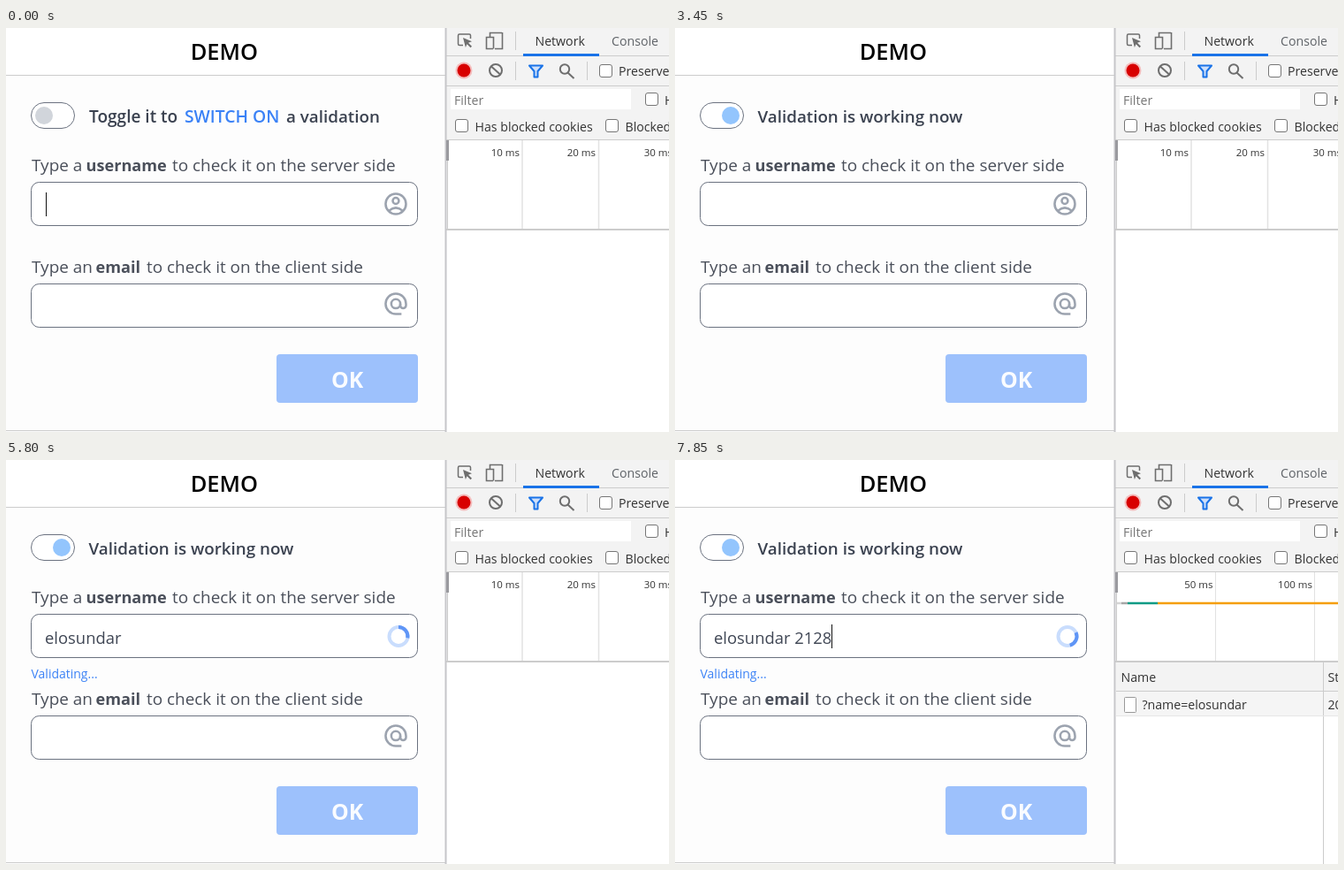
Animation of 750 by 457 pixels, one loop 8 s. Source, as an HTML page:

```html
<!DOCTYPE html>
<html lang="en">
<head>
<meta charset="utf-8">
<title>Form validation demo</title>
<style>
html, body { margin: 0; width: 100%; height: 100%; overflow: hidden; background: #fff; }
svg { display: block; width: 750px; height: 457px; font-family: "Open Sans", "Noto Sans", sans-serif; }
text { white-space: pre; }
.label { font-size: 18.95px; fill: #4a4f5a; }
.label .b { font-size: 18.15px; font-weight: 700; }
.head { font-size: 18.8px; font-weight: 600; fill: #3b4250; }
.hint { font-size: 14px; }
.hint .b { font-weight: 700; }
.tool { font-size: 14.15px; fill: #333; }
.tick { font-size: 11.5px; fill: #333; }
.line { fill: none; stroke: #ccc; }
.box { fill: #fff; stroke: #767676; }
.field { fill: #fff; stroke: #6b7280; }
.icon { fill: none; stroke: #9ca3af; stroke-width: 2; }
.grey { fill: none; stroke: #6e6e6e; stroke-width: 2; }
</style>
</head>
<body>
<svg viewBox="0 0 750 457">
  <defs>
    <rect id="check" x=".5" y=".5" width="14" height="14" rx="2.5" class="box"/>
  </defs>

  <!-- form -->
  <rect width="498" height="457" fill="#fdfdfd"/>
  <rect width="497" height="53" fill="#fff"/>
  <path class="line" d="M0 53.5H497M0 455.5H497" stroke="#d1d5db"/>
  <text x="208.7" y="36" font-size="25.4" font-weight="600">DEMO</text>

  <rect x="28.5" y="84.5" width="49" height="29" rx="14.5" class="field"/>
  <circle id="knob" cy="99" r="10"/>
  <g id="offText" class="head">
    <text x="94" y="107" font-size="19">Toggle it to</text>
    <text x="202" y="107" style="font-size:19.3px" fill="#3b82f6">SWITCH ON</text>
    <text x="317" y="107">a validation</text>
  </g>
  <text id="onText" class="head" x="93.5" y="107">Validation is working now</text>

  <g class="label">
    <text y="162"><tspan x="29">Type a</tspan><tspan x="90.5" class="b">username</tspan><tspan x="188">to check it on the server side</tspan></text>
    <text y="277"><tspan x="29">Type an</tspan><tspan x="101.5" class="b">email</tspan><tspan x="159">to check it on the client side</tspan></text>
  </g>

  <rect id="nameField" x="28.5" y="174.5" width="437" height="49" rx="9" class="field"/>
  <rect x="28.5" y="289.5" width="437" height="49" rx="9" class="field"/>
  <text id="typed" x="44" y="208" font-size="18.4" fill="#3f4654"></text>
  <rect id="caret" y="186" width="1" height="27" fill="#111"/>

  <g id="userIcon" class="icon" transform="translate(425.6 183.6) scale(1.28)">
    <circle cx="12" cy="12" r="9"/>
    <circle cx="12" cy="9.3" r="2.7"/>
    <path d="M6 18Q12 12.8 18 18"/>
  </g>
  <g id="okIcon" class="icon" style="stroke:#059669" transform="translate(425.6 183.6) scale(1.28)">
    <circle cx="12" cy="12" r="9"/>
    <path d="M8 12.2l2.8 2.8l5.2-5.2"/>
  </g>
  <g id="spinner" fill="none" stroke-width="4">
    <circle cx="444" cy="199.5" r="10.5" stroke="#c9ddfd"/>
    <path id="arc" d="M444 189A10.5 10.5 0 0 1 454.3 201.3" stroke="#5f95f6"/>
  </g>
  <g class="icon" transform="translate(425.6 296.6) scale(1.28)">
    <circle cx="12" cy="12" r="4"/>
    <path d="M16 12v1.4a2.5 2.5 0 0 0 5 0V12a9 9 0 1 0-9 9h5"/>
  </g>

  <text id="busy" class="hint" x="28.5" y="247" fill="#3b82f6">Validating...</text>
  <text id="found" class="hint" y="247" fill="#059669"><tspan x="28.5">The username '</tspan><tspan x="129" class="b">elosundar</tspan><tspan x="198">' found on the server</tspan><tspan x="340" class="b">60600</tspan><tspan x="387">times</tspan></text>

  <rect x="306" y="369" width="160" height="55" rx="4" fill="#9dc1fc"/>
  <text x="386" y="407" font-size="24.8" font-weight="700" fill="#fafcff" text-anchor="middle">OK</text>

  <!-- network panel -->
  <rect x="498" width="252" height="457" fill="#fff"/>
  <rect x="498" width="252" height="126" fill="#f3f3f3"/>
  <rect x="503" y="69" width="204" height="23" fill="#fff"/>
  <path class="line" d="M498 31.5H750M498 65.5H750M498 126.5H750M576.5 4V25M576.5 38V59M657.5 38V59"/>
  <path class="line" d="M497.5 0V457" stroke-width="2" style="stroke:#c6c6c9"/>
  <rect x="585" y="29" width="86" height="3" fill="#1a73e8"/>

  <g class="grey" stroke-width="1.6">
    <path d="M517 19.5H513a1.500 1.500 0 0 1-1.500-1.500V8.500A1.500 1.500 0 0 1 513 7H524a1.500 1.500 0 0 1 1.500 1.500V12" style="stroke-width:1.5"/>
    <path d="M517 11l10 4.200-4 1.500 4 4-1.500 1.500-4-4-1.600 3.800z" fill="#6e6e6e" stroke="none"/>
    <path d="M547.500 10V5.500H561M551 23.500H543.500V10.500H551.500V23.500M553 23.500H561.500V5" style="stroke-width:1.6"/>
    <circle cx="554" cy="48" r="7"/>
    <path d="M549 43.500L559 52.500"/>
    <circle cx="632" cy="46.500" r="5.200"/>
    <path d="M635.500 50.500L642.500 57"/>
  </g>
  <circle cx="518" cy="48" r="9.500" fill="#f4bcbc"/>
  <circle cx="518" cy="48" r="7.500" fill="#d80000"/>
  <path d="M592 42.500H607L601.500 49V55.500H597.500V49z" fill="#cfe0fa" stroke="#1a73e8" stroke-width="2" stroke-linejoin="round"/>

  <use href="#check" x="671" y="41"/>
  <use href="#check" x="723" y="73"/>
  <use href="#check" x="508" y="103"/>
  <use href="#check" x="678" y="103"/>
  <g class="tool">
    <text x="598.5" y="20">Network</text>
    <text x="685" y="20" fill="#5f6368">Console</text>
    <text x="693" y="54">Preserve log</text>
    <text x="507" y="87" fill="#757575">Filter</text>
    <text x="745" y="87">Hide</text>
    <text x="530.5" y="117">Has blocked cookies</text>
    <text x="700.5" y="117">Blocked Requests</text>
  </g>

  <path class="line" d="M499.5 127V227"/>
  <path class="line" d="M498 228H750" stroke-width="2"/>
  <g id="idle">
    <path class="line" d="M584 127V227M670.5 127V227" style="stroke:#e2e2e2" stroke-width="1.5"/>
    <g class="tick" text-anchor="end">
      <text x="581" y="145">10 ms</text>
      <text x="667" y="145">20 ms</text>
      <text x="754" y="145">30 ms</text>
    </g>
  </g>
  <g id="loaded">
    <path class="line" d="M611.5 127V227M723.5 127V227" style="stroke:#e2e2e2"/>
    <g class="tick" text-anchor="end">
      <text x="608.5" y="145">50 ms</text>
      <text x="721" y="145">100 ms</text>
    </g>
    <g fill="none" stroke-width="2.5">
      <path d="M500 162H505" stroke="#d5d5d5"/>
      <path d="M505 162H512" stroke="#a6a6a6"/>
      <path d="M512 162H546" stroke="#0d9b85"/>
      <path d="M546 162H750" stroke="#f59e0b"/>
    </g>
    <rect x="499" y="229" width="251" height="32" fill="#f3f3f3"/>
    <rect x="499" y="262" width="251" height="27" fill="#f5f5f5"/>
    <path class="line" d="M499 261.5H750M733.5 229V457"/>
    <path class="line" d="M499 289.5H750" style="stroke:#e6e6e6"/>
    <rect x="508.5" y="268.500" width="13" height="17" rx="1" fill="#fff" stroke="#999"/>
    <g class="tool">
      <text x="504.5" y="251">Name</text>
      <text x="738.5" y="251">Status</text>
      <text x="528.5" y="282">?name=elosundar</text>
      <text x="738.5" y="282">200</text>
    </g>
  </g>
  <rect x="498" y="127" width="3" height="23" fill="#9a9a9f"/>
</svg>

<script>
const LOOP = 8000, STEP = 150;
const TEXT = "elosundar 2128";
// letters shown per step while typing and erasing before the switch
const FIRST = [0, 1, 2, 3, 4, 5, 7, 9, 9, 9, 9, 9, 9, 8, 7, 6, 4, 3, 2, 1, 0, 0];
const SWITCH = 3300, ON = 3450, RETYPE = 4450, DONE = 5950, FOCUS = 6950, APPEND = 7250;

const el = id => document.getElementById(id);
const show = (id, on) => el(id).style.display = on ? "" : "none";
const stepsSince = (t, start) => Math.floor((t - start) / STEP);

function stateAt(t) {
  if (t < SWITCH) {
    const k = stepsSince(t, 0);
    return { count: FIRST[k], caret: k < 8 || k === 9 || k === 11 || k === 21 };
  }
  if (t < RETYPE) return { count: 0 };
  if (t < DONE) {
    const k = stepsSince(t, RETYPE);
    return { count: Math.min(9, k + 1), caret: k < 9, busy: true, spin: k };
  }
  if (t < APPEND) return { count: 9, caret: t >= FOCUS, found: true };
  const k = stepsSince(t, APPEND);
  return { count: 10 + k, caret: true, busy: true, spin: k };
}

function draw(t) {
  const s = stateAt(t), on = t >= SWITCH, loaded = t >= DONE;

  el("knob").setAttribute("cx", t < SWITCH ? 43 : t < ON ? 53 : 63);
  el("knob").setAttribute("fill", t < SWITCH ? "#d1d5db" : t < ON ? "#b2cdec" : "#93c5fd");
  show("offText", !on);
  show("onText", on);

  const typed = el("typed");
  typed.textContent = TEXT.slice(0, s.count);
  const end = s.count ? typed.getComputedTextLength() : 1;
  el("caret").setAttribute("x", 44 + Math.floor(end));
  show("caret", s.caret);

  el("nameField").style.stroke = s.found ? "#10b981" : "";
  show("userIcon", !s.busy && !s.found);
  show("okIcon", s.found);
  show("found", s.found);
  show("busy", s.busy);
  show("spinner", s.busy);
  if (s.busy) el("arc").setAttribute("transform", `rotate(${45 + 275 * s.spin} 444 199.5)`);

  show("idle", !loaded);
  show("loaded", loaded);
}

const start = performance.now();
function frame() {
  draw((performance.now() - start) % LOOP);
  requestAnimationFrame(frame);
}
frame();
</script>
</body>
</html>
```
